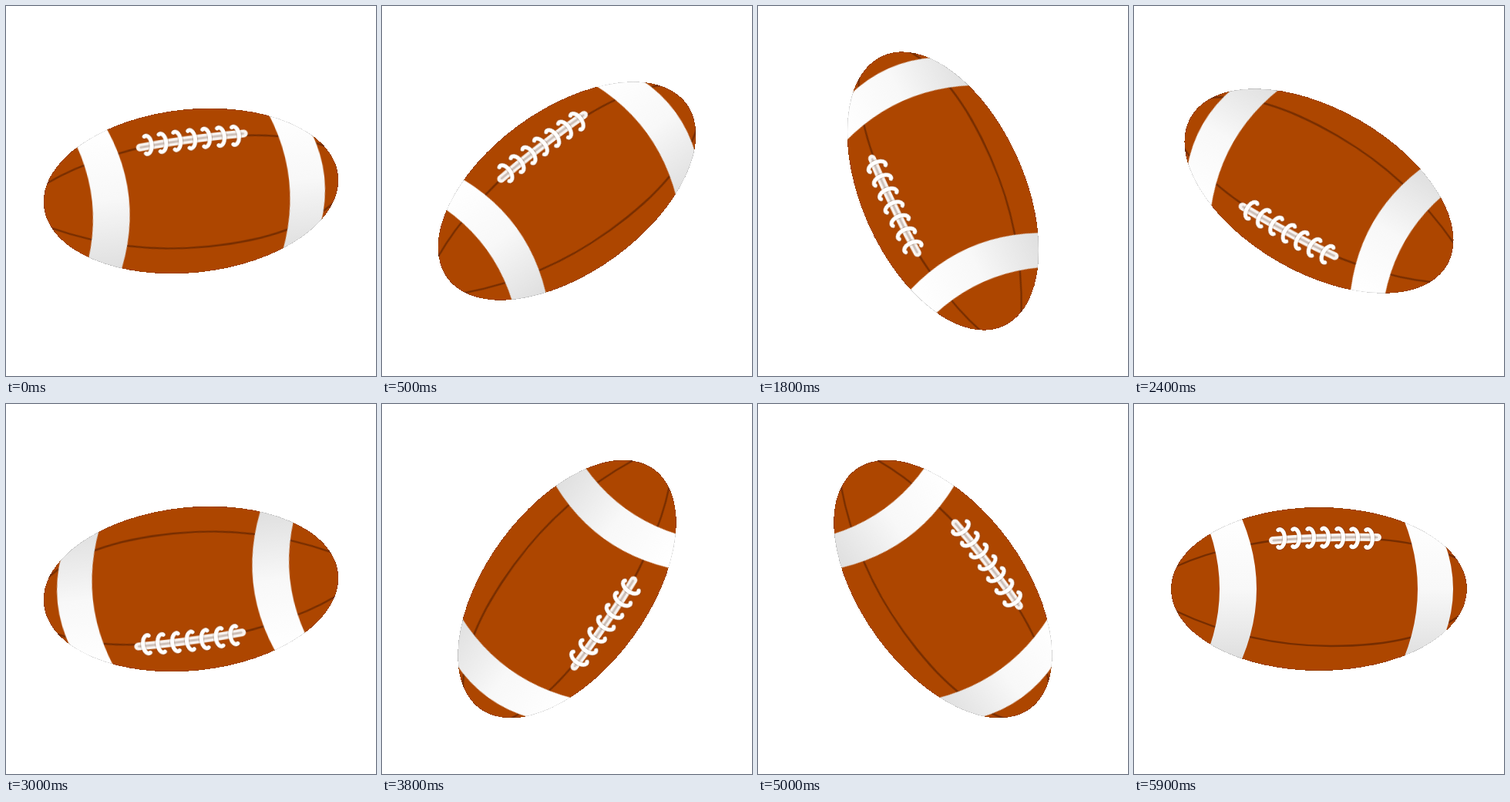
An HTML page for the animation above (6 s loop, 480 px wide and 480 px high).

```html
<!DOCTYPE html>
<html lang="en">
<head>
<meta charset="utf-8">
<title>Spinning football</title>
<style>
  html, body { margin: 0; height: 100%; overflow: hidden; background: #fff; }
  svg { display: block; width: 100vw; height: 100vh; }
  path { fill: none; stroke-linecap: round; }
</style>
</head>
<body>
<svg viewBox="0 0 480 480">
  <defs>
    <linearGradient id="shade" gradientUnits="userSpaceOnUse" x1="0" y1="150" x2="0" y2="330">
      <stop offset="0" stop-color="#fff"/>
      <stop offset=".5" stop-color="#f8f8f8"/>
      <stop offset="1" stop-color="#dfdfdf"/>
    </linearGradient>
    <filter id="soften" filterUnits="userSpaceOnUse" x="0" y="0" width="480" height="480" color-interpolation-filters="sRGB">
      <feGaussianBlur stdDeviation=".6"/>
    </filter>
    <path id="stitch" d="M-2.5-11C0-14 6-10 6 0S0 14-2.5 11"/>
  </defs>
  <g id="ball">
    <ellipse cx="240" cy="240" rx="193" ry="107" fill="#ad4600"/>
    <g filter="url(#soften)">
      <g stroke="#762d00" stroke-width="2.4">
        <path d="M54 211C100 190 170 173 250 173S385 181 426 204"/>
        <path d="M53 268C110 295 175 314 255 314S388 300 426 272"/>
      </g>
      <g id="bands"></g>
      <path d="M180 177Q248 172 316 173" stroke="#f8f4f1" stroke-width="10"/>
      <path d="M181 177Q248 172 315 173" stroke="#cdbfb7" stroke-width="3"/>
      <g id="laces"></g>
    </g>
    <ellipse cx="240" cy="240" rx="192" ry="106" fill="none" stroke="#000" stroke-opacity=".2"/>
    <!-- White surround gives the ball its crisp outline -->
    <path shape-rendering="crispEdges" style="fill:#fff" fill-rule="evenodd"
      d="M-200-200H680V680H-200ZM48 240a192 106 0 0 0 384 0a192 106 0 0 0-384 0Z"/>
  </g>
</svg>
<script>
const STEP_MS = 100, STEPS = 60;
const byId = id => document.getElementById(id);

// A band lies between two edges, each given by its middle x and its bow
const band = (left, bowL, right, bowR) =>
  `<path style="fill:url(#shade)" d="M${left - bowL} 120Q${left + bowL} 240 ${left - bowL} 360` +
  `H${right - bowR}Q${right + bowR} 240 ${right - bowR} 120Z"/>`;
byId('bands').innerHTML = band(111, 33, 159, 33) + band(368, 32, 414, 44);

const stitches = (color, width) => Array.from({ length: 7 }, (_, i) =>
  `<use href="#stitch" x="${189.5 + 19 * i}" y="${174.5 - i * (6 - i) * 0.15}" stroke="${color}" stroke-width="${width}"/>`).join('');
byId('laces').innerHTML = stitches('rgba(90,40,0,.25)', 7) + stitches('#fff', 5.2);

function draw(now) {
  const step = Math.floor(now / STEP_MS) % STEPS + 1;
  byId('ball').setAttribute('transform', `rotate(${-step * 360 / STEPS} 240 240)`);
  requestAnimationFrame(draw);
}
draw(performance.now());
</script>
</body>
</html>
```
